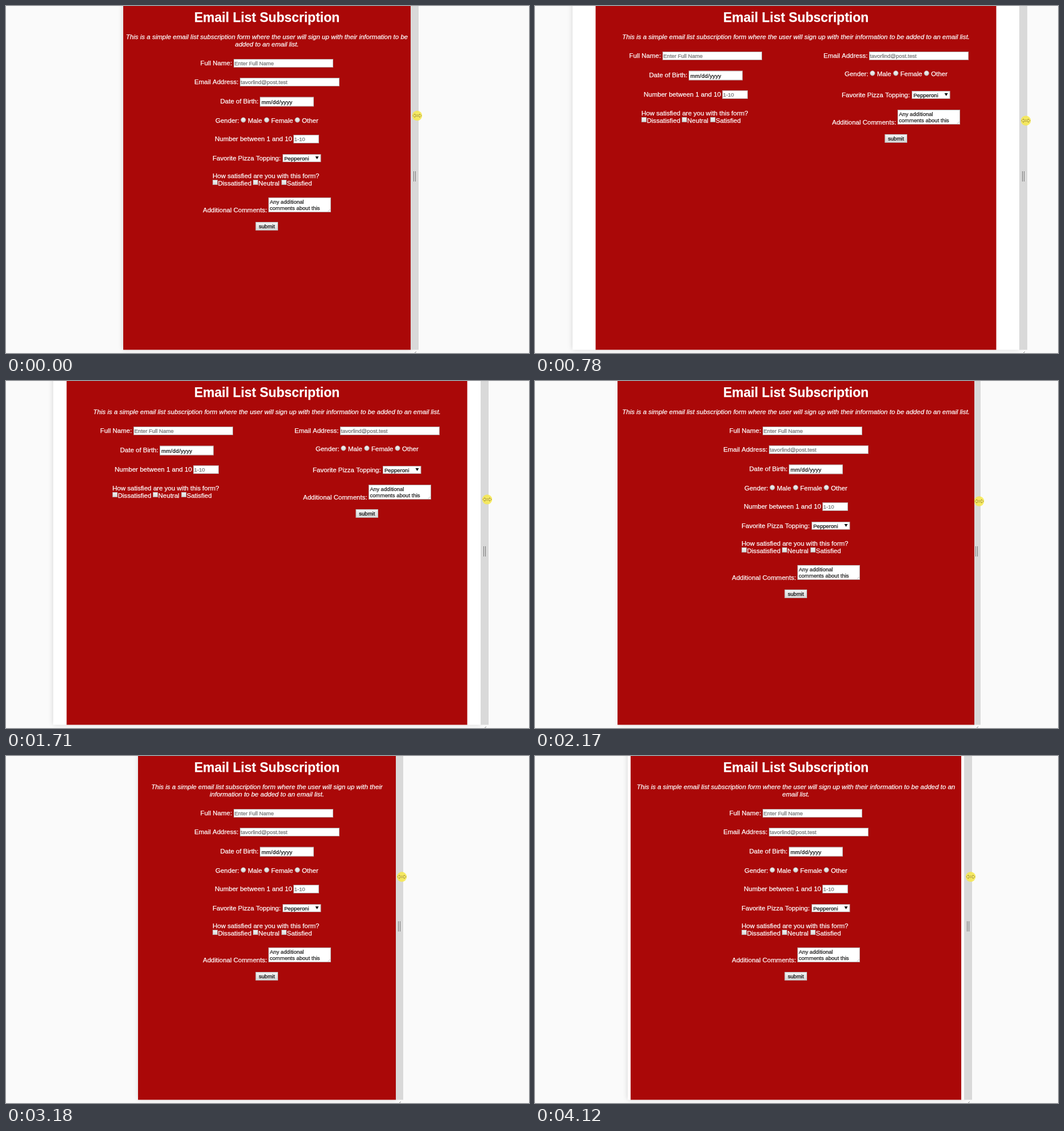
Recreate the animation shown at these times as an HTML page with a canvas. Size 919 by 609 pixels, loop 4.19 s.

```html
<!DOCTYPE html>
<html lang="en">
<head>
<meta charset="utf-8">
<title>Responsive form</title>
<style>
  html, body { margin: 0; width: 100%; height: 100%; overflow: hidden; background: #fafafa; }
  canvas { display: block; }
</style>
</head>
<body>
<canvas id="stage" width="919" height="609"></canvas>
<script>
const ctx = document.getElementById('stage').getContext('2d');
const LOOP = 4190, STEP = 77.4, LAST = 53;
const MID = 458.5, BOTTOM = 603.4, BAR = 14, MAX_HALF = 352, COLUMN = 176;
const SANS = '"Liberation Sans", Arial, sans-serif';
const BODY = '11.53px ' + SANS, FIELD = '9.56px ' + SANS;
const INTRO = 'This is a simple email list subscription form where the user will sign up with their information to be added to an email list.';

// [step, value] pairs: right end of the drag bar, height of the pointer
const EDGE = [[0, 725], [6, 797], [7, 815], [14, 927], [16, 938], [21, 861], [28, 783],
  [35, 720], [42, 695], [44, 693], [45, 693], [46, 700], [47, 707], [52, 753], [53, 768]];
const POINTER = [[0, 192.5], [6, 199], [14, 203], [28, 211], [35, 211], [47, 213], [53, 212]];

// Smooth curve through the keys
function curve(keys, x) {
  const last = keys.length - 1;
  let i = 0;
  while (i < last - 1 && x >= keys[i + 1][0]) i++;
  const slope = k => {
    const a = keys[Math.max(0, k - 1)], b = keys[Math.min(last, k + 1)];
    return (b[1] - a[1]) / (b[0] - a[0]);
  };
  const [x0, y0] = keys[i], [x1, y1] = keys[i + 1];
  const w = x1 - x0, u = (x - x0) / w, v = 1 - u;
  return y0 * v * v * (1 + 2 * u) + y1 * u * u * (3 - 2 * u)
    + w * u * v * (v * slope(i) - u * slope(i + 1));
}

function rect(x, y, w, h, color) {
  ctx.fillStyle = color;
  ctx.fillRect(x, y, w, h);
}

function text(str, x, y, font = BODY, color = '#fff', align = 'left') {
  ctx.font = font;
  ctx.fillStyle = ctx.strokeStyle = color;
  ctx.textAlign = align;
  ctx.lineWidth = 0.25;
  ctx.fillText(str, x, y);
  ctx.strokeText(str, x, y);
}

function line(color, width, ...points) {
  ctx.strokeStyle = color;
  ctx.lineWidth = width;
  ctx.beginPath();
  points.forEach(([x, y]) => ctx.lineTo(x, y));
  ctx.stroke();
}

function box(x, y, w, h, fill = '#fff', border = '#b5a5a5') {
  rect(x, y, w, h, border);
  rect(x + 1, y + 1, w - 2, h - 2, fill);
}

function input(x, y, w, hint) {
  box(x, y, w, 15);
  text(hint, x + 1.5, y + 11, FIELD, '#757575');
}

function shade(y, h) {
  const g = ctx.createLinearGradient(0, y, 0, y + h);
  g.addColorStop(0, '#f4f4f4');
  g.addColorStop(1, '#d6d6d6');
  return g;
}

function radio(x, y) {
  ctx.beginPath();
  ctx.arc(x, y, 4.2, 0, 7);
  ctx.fillStyle = shade(y - 4, 8);
  ctx.fill();
  ctx.strokeStyle = '#a99';
  ctx.lineWidth = 0.8;
  ctx.stroke();
}

const check = (x, y) => box(x, y, 9, 9, shade(y, 9), '#b9a9a9');

// Each row: column side, rise when in two columns, drawing
const ROWS = [
  [-1, 0, () => {
    text('Full Name:', 341.5, 90.5);
    input(400, 80, 175, 'Enter Full Name');
  }],
  [1, 33, () => {
    text('Email Address:', 331, 123.5);
    input(411, 113, 175, 'tavorlind@post.test');
  }],
  [-1, 33, () => {
    text('Date of Birth:', 376.5, 158);
    box(446, 146.5, 95, 17);
    ctx.letterSpacing = '0.35px';
    text('mm/dd/yyyy', 449, 158.5, FIELD, '#111');
    ctx.letterSpacing = '0px';
  }],
  [1, 69, () => {
    text('Gender:', 368, 192);
    [['Male', 417], ['Female', 458], ['Other', 512]].forEach(([name, x]) => {
      radio(x, 187);
      text(name, x + 8, 192);
    });
  }],
  [-1, 65, () => {
    text('Number between 1 and 10', 367, 224);
    input(505, 213, 45, '1-10');
  }],
  [1, 98, () => {
    text('Favorite Pizza Topping:', 363, 257.5);
    box(486, 247, 67.5, 14);
    text('Pepperoni', 489, 257.5, FIELD, '#111');
    ctx.fillStyle = '#111';
    ctx.beginPath();
    ctx.moveTo(543.5, 251);
    ctx.lineTo(549.5, 251);
    ctx.lineTo(546.5, 256);
    ctx.fill();
  }],
  [-1, 97, () => {
    text('How satisfied are you with this form?', 363, 289);
    [['Dissatisfied', 363], ['Neutral', 434], ['Satisfied', 484]].forEach(([name, x]) => {
      check(x, 292);
      text(name, x + 9.5, 301.5);
    });
  }],
  [1, 141, () => {
    text('Additional Comments:', 346, 349);
    box(461, 323, 110, 26);
    text('Any additional', 463.5, 334, FIELD, '#222');
    text('comments about this', 463.5, 345, FIELD, '#222');
    line('#999', 0.7, [566, 347.5], [569.5, 344]);
    box(438.5, 366, 39.5, 15, shade(366, 15), '#bbb');
    text('submit', 458.3, 377, FIELD, '#111', 'center');
  }]
];

function wrap(str, width) {
  const lines = [''];
  for (const word of str.split(' ')) {
    const longer = (lines[lines.length - 1] + ' ' + word).trim();
    if (ctx.measureText(longer).width > width) lines.push(word);
    else lines[lines.length - 1] = longer;
  }
  return lines;
}

function drawForm(half) {
  rect(MID - half, 0, half * 2, BOTTOM, '#aa0808');
  text('Email List Subscription', MID, 28, 'bold 23px ' + SANS, '#fff', 'center');
  const font = 'italic ' + BODY;
  ctx.font = font;
  const lines = wrap(INTRO, half * 2 - 2);
  lines.forEach((str, i) => text(str, MID, 58 + i * 13, font, '#fff', 'center'));

  const wide = half >= MAX_HALF;
  for (const [side, rise, draw] of ROWS) {
    ctx.save();
    ctx.translate(wide ? side * COLUMN : 0, (lines.length - 1) * 13 - (wide ? rise : 0));
    draw();
    ctx.restore();
  }
}

function drawPointer(x, y) {
  ctx.save();
  ctx.translate(x, y);
  ctx.fillStyle = 'rgba(246, 232, 80, 0.88)';
  ctx.beginPath();
  ctx.arc(0, 0, 8.7, 0, 7);
  ctx.fill();
  ctx.beginPath();
  for (const s of [1, -1]) {
    [[4, -1.1], [4, -3.2], [7.7, 0], [4, 3.2], [4, 1.1]]
      .forEach(([px, py]) => ctx.lineTo(px * s, py * s));
  }
  ctx.closePath();
  ctx.fillStyle = '#f8ef80';
  ctx.fill();
  ctx.strokeStyle = '#a08c28';
  ctx.lineWidth = 0.8;
  ctx.stroke();
  ctx.restore();
}

function draw(now) {
  const step = Math.min(LAST, Math.floor(now % LOOP / STEP));
  const halfAt = s => curve(EDGE, s) - BAR - MID;
  const end = Math.round(curve(EDGE, step));
  const half = end - BAR - MID;
  // The page inside catches up slightly after its frame
  const lagged = Math.round(halfAt(Math.max(0, step - 0.3)) + 0.5) - 0.5;

  rect(0, 0, 919, 609, '#fafafa');
  ctx.save();
  ctx.shadowColor = 'rgba(0, 0, 0, 0.16)';
  ctx.shadowBlur = 9;
  rect(MID - half, -20, half * 2, BOTTOM + 20, '#fff');
  ctx.restore();
  rect(end - BAR, 0, BAR, BOTTOM, '#d9d9d9');
  rect(end - 9, 290, 1, 18, '#777');
  rect(end - 6, 290, 1, 18, '#777');
  line('#888', 1, [end - 7, 609], [end - 4, 606.5]);

  drawForm(Math.min(MAX_HALF, lagged));
  drawPointer(end - 2.5, curve(POINTER, step));
}

const start = performance.now();
function tick() {
  draw(performance.now() - start);
  requestAnimationFrame(tick);
}
tick();
</script>
</body>
</html>
```
